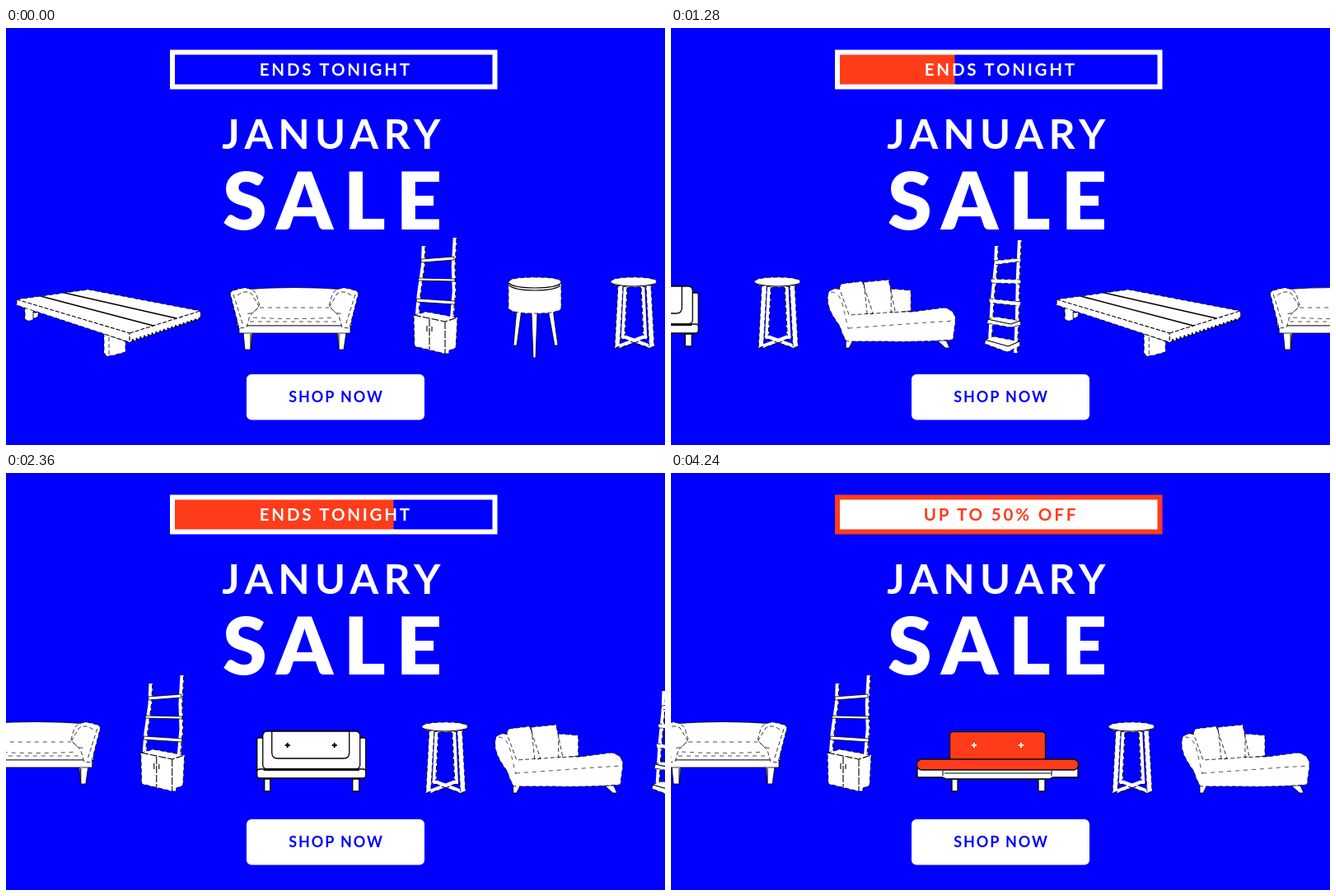
These frames come from a looping animation (800x507 px, 4.36 s). An HTML page:

```html
<!DOCTYPE html>
<html lang="en">
<head>
<meta charset="utf-8">
<title>January Sale</title>
<style>
  html, body { margin: 0; width: 100%; height: 100%; overflow: hidden; background: #00f; }
  svg { display: block; }
  text { font-family: Lato, "Open Sans", sans-serif; font-weight: 700; fill: #fff; text-anchor: middle; }
  .item { fill: #fff; stroke: #000; stroke-width: .8; stroke-linejoin: round; }
  .rough { stroke-dasharray: 5 3; }
  .line { fill: none; stroke-width: 1.1; }
  .pole { fill: none; stroke: #fff; stroke-width: 4.5; }
  .grain { fill: none; stroke-width: .7; stroke-dasharray: 5 5; }
  .bold { stroke-width: 1.3; }
  .red { fill: #ff3c1a; }
  .plus { fill: none; stroke-width: 2; }
</style>
</head>
<body>
<svg width="800" height="507" viewBox="0 0 800 507">
  <defs>
    <g id="platform" class="item">
      <path class="rough" d="M23 339h10v16l-7 1-3-2zM33 346h6v5l-6 2zM119 372l26 9v13l-15 4-8 1-3-4zM125 376v21"/>
      <path class="rough" d="M13 330L100 318 236 344V353L150 382 13 337z"/>
      <path class="line" d="M71 322L207 353M42 326L179 362" style="stroke-width:1.5"/>
      <path class="line" d="M13 330L150 371V382M150 371L236 344" stroke-dasharray="5 2"/>
      <path class="line" d="M153 380L236 353" style="stroke-width:3" stroke-dasharray="2 3"/>
    </g>
    <g id="daybed" class="item">
      <path d="M288 370h11l-2 21h-7zM402 370h11l-3 21h-6z"/>
      <path class="line" d="M297 372v18M404 372v18"/>
      <path d="M287 318Q350 313 413 318L420 362H280z"/>
      <path d="M283 362H418V371H283z"/>
      <path id="arm" class="rough" d="M276 319L288 316Q300 316 304 324L308 338 296 350 292 364 283 365 272 322zM276 324L288 362M281 325Q290 318 298 323L307 338Q300 349 291 347"/>
      <use href="#arm" transform="matrix(-1 0 0 1 700 0)"/>
      <path class="grain" d="M308 340H392M300 352Q350 355 400 352M296 357H404"/>
    </g>
    <g id="cabinet" class="item">
      <path class="pole" d="M507 265L506 290 501 325 499 352M545 255L543 290 544 320 541 356"/>
      <path class="line rough" d="M509 266L508 290 503 325 501 346M547 256L545 290 546 320 543 350"/>
      <path d="M504 281l40-3v4l-40 3zM501 304l44 1v3l-45-1zM499 329l46 3v4l-47-3z"/>
      <path class="rough" d="M495 349L510 345 548 352 546 389 538 392 537 396H533L496 387z"/>
      <path class="line" d="M495 349L533 357 548 352M533 357V396M514 354V391M511 362v7M517 363v6" stroke-dasharray="9 2"/>
    </g>
    <g id="stool" class="item">
      <path d="M620 342h6l-6 44h-4zM658 342h6l6 44h-4zM638 345h7l-2 56h-3z"/>
      <path class="rough" d="M610 309Q611 303 642 303T674 309V341Q670 347 642 347T610 341z"/>
      <path class="line" d="M610 310Q616 316 642 316T674 310M611 313Q618 319 642 319T673 313"/>
    </g>
    <g id="table" class="item">
      <path class="pole" d="M752 314L749 378M773 314L776 378M744 387L778 374M782 387L747 374"/>
      <path class="line rough" d="M754 316L751 374M771 316L774 374M748 388L780 377M778 388L746 377"/>
      <path d="M743 313h6l-4 74-6 2zM777 313h6l4 74-6 2z" class="rough"/>
      <path d="M734 308Q738 303 762 303T790 308Q788 315 762 315T734 308z" class="rough"/>
      <path class="line" d="M736 311Q748 314 762 314T788 311"/>
    </g>
    <g id="chaise" class="item">
      <path d="M211 379h9l-5 10h-4zM322 380h11l4 9h-5z"/>
      <path class="rough" d="M189 327Q189 317 200 317L222 320 234 345 292 345 330 340Q345 343 344 357L341 379Q300 382 260 381L212 381Q207 374 204 363C198 354 188 342 189 327z"/>
      <path class="rough" d="M266 317l24 2v25l-24 2zM233 309l30-3 8 39-34 3zM206 311l25-3 13 39-29 2-12-33z"/>
      <path class="grain" d="M193 321Q204 321 208 340L214 366M214 365Q270 361 310 358L343 356"/>
    </g>
    <g id="shelf" class="item">
      <path class="pole" d="M111 265L110 290 106 330 103 381M139 258L137 300 136 350 134 395"/>
      <path class="line rough" d="M113 266L112 290 108 330 105 381M141 260L139 300 138 350 136 395"/>
      <path class="rough" d="M108 283l28-3 2 4-30 4zM104 305l36 1v5l-35-1zM102 329l38 4v5l-38-4zM100 354l10-3 30 5v5l-12 3-28-5zM97 379l10-4 32 6v6l-15 7-27-10z"/>
      <path class="line" d="M100 354l28 6 12-4M97 379l28 8 14-6"/>
    </g>
    <path id="buttons" class="plus" d="M365 331h6M368 328v6M422 331h6M425 328v6"/>
  </defs>

  <g id="row">
    <use href="#daybed" x="-1172" y="-13"/>
    <use href="#cabinet" x="-1190" y="-9"/>
    <use href="#table" x="-1088"/>
    <use href="#chaise" x="-454"/>
    <use href="#shelf" x="-171"/>
    <use href="#platform"/>
    <use href="#daybed"/>
    <use href="#cabinet"/>
    <use href="#stool"/>
    <use href="#table"/>

    <g transform="translate(-885)">
      <g id="upright" class="item bold">
        <path d="M340 372h7v15h-7zM447 372h8v15h-8z"/>
        <rect x="331" y="322" width="10" height="42" rx="2"/>
        <rect x="453" y="322" width="10" height="42" rx="2"/>
        <rect x="338" y="314" width="118" height="46" rx="5"/>
        <path id="cushion" d="M349 314H443V340Q443 347 436 347H356Q349 347 349 340z"/>
        <rect x="331" y="360" width="132" height="11" rx="3"/>
        <path class="line" d="M339 361H455" style="stroke-width:2"/>
        <use href="#buttons"/>
      </g>
      <g id="flat" class="item bold">
        <path d="M341 372h7v15h-7zM446 372h8v15h-8z"/>
        <g id="mattress">
          <rect class="red" x="338.500" y="314.500" width="116" height="35" rx="4"/>
          <use href="#buttons" stroke="#fff"/>
          <path d="M299 359H494V370H463L460 372H334L330 370H299z"/>
          <path class="line" d="M330 362V368M462 362V368M332 365H461"/>
          <rect class="red" x="298.500" y="348" width="196" height="13" rx="6"/>
        </g>
      </g>
    </g>
  </g>

  <rect id="bar" class="red" x="205" y="32" height="37"/>
  <rect id="frame" x="202" y="29.500" width="391.500" height="42" fill="none" stroke-width="6"/>
  <text id="label" y="58" font-size="20.500"></text>
  <text x="398" y="146.500" font-size="50" letter-spacing="6.200">JANUARY</text>
  <text x="402.500" y="245" font-size="97" letter-spacing="12.800" style="font-weight:900">SALE</text>
  <rect x="292" y="421" width="216" height="55.500" rx="6" fill="#fff"/>
  <text x="401" y="455" font-size="18" letter-spacing="1.900" style="fill:#00f">SHOP NOW</text>
</svg>

<script>
const $ = id => document.getElementById(id);
const RED = '#ff3c1a', LOOP = 4360, TICK = 40;
// Length of each pose in ticks.
const holds = [...'4453444443453444443454344443'].map(Number);

function poseAt(ms) {
  let pose = 0;
  for (let end = holds[0] * TICK; ms >= end && pose < holds.length - 1; end += holds[pose] * TICK) pose++;
  return pose;
}

// Gentle acceleration, a slower overshoot, then a snap back to rest.
function slide(pose) {
  if (pose <= 15) return 56.5 * pose + 0.05 * pose * pose;
  if (pose >= 20) return 885;
  const u = (pose - 15) / 4;
  return 859 + 65 * u * u * (3 - 2 * u);
}

function setLabel(text, x, spacing, color) {
  const label = $('label');
  label.textContent = text;
  label.setAttribute('x', x);
  label.setAttribute('letter-spacing', spacing);
  label.style.fill = color;
}

function draw(pose) {
  const full = pose >= 22, offer = pose >= 23;
  $('row').setAttribute('transform', `translate(${slide(pose)})`);

  $('bar').setAttribute('width', full ? 386 : Math.max(0, 18 * pose - 4.5));
  $('bar').style.fill = offer ? '#fff' : RED;
  $('frame').style.stroke = full ? RED : '#fff';
  if (full) setLabel('UP TO 50% OFF', 400.4, 2.85, offer ? RED : '#fff');
  else setLabel('ENDS TONIGHT', 400.3, 2.75, '#fff');

  $('upright').style.display = full ? 'none' : '';
  $('flat').style.display = full ? '' : 'none';
  $('cushion').style.fill = pose === 21 ? RED : '#fff';
  const stretch = pose === 22 ? 0.84 : pose === 24 || pose === 26 ? 1.04 : 1;
  $('mattress').setAttribute('transform', `translate(396.5) scale(${stretch} 1) translate(-396.5)`);
}

let shown = -1;
function tick() {
  const pose = poseAt(performance.now() % LOOP);
  if (pose !== shown) draw(shown = pose);
  requestAnimationFrame(tick);
}
tick();
</script>
</body>
</html>
```
